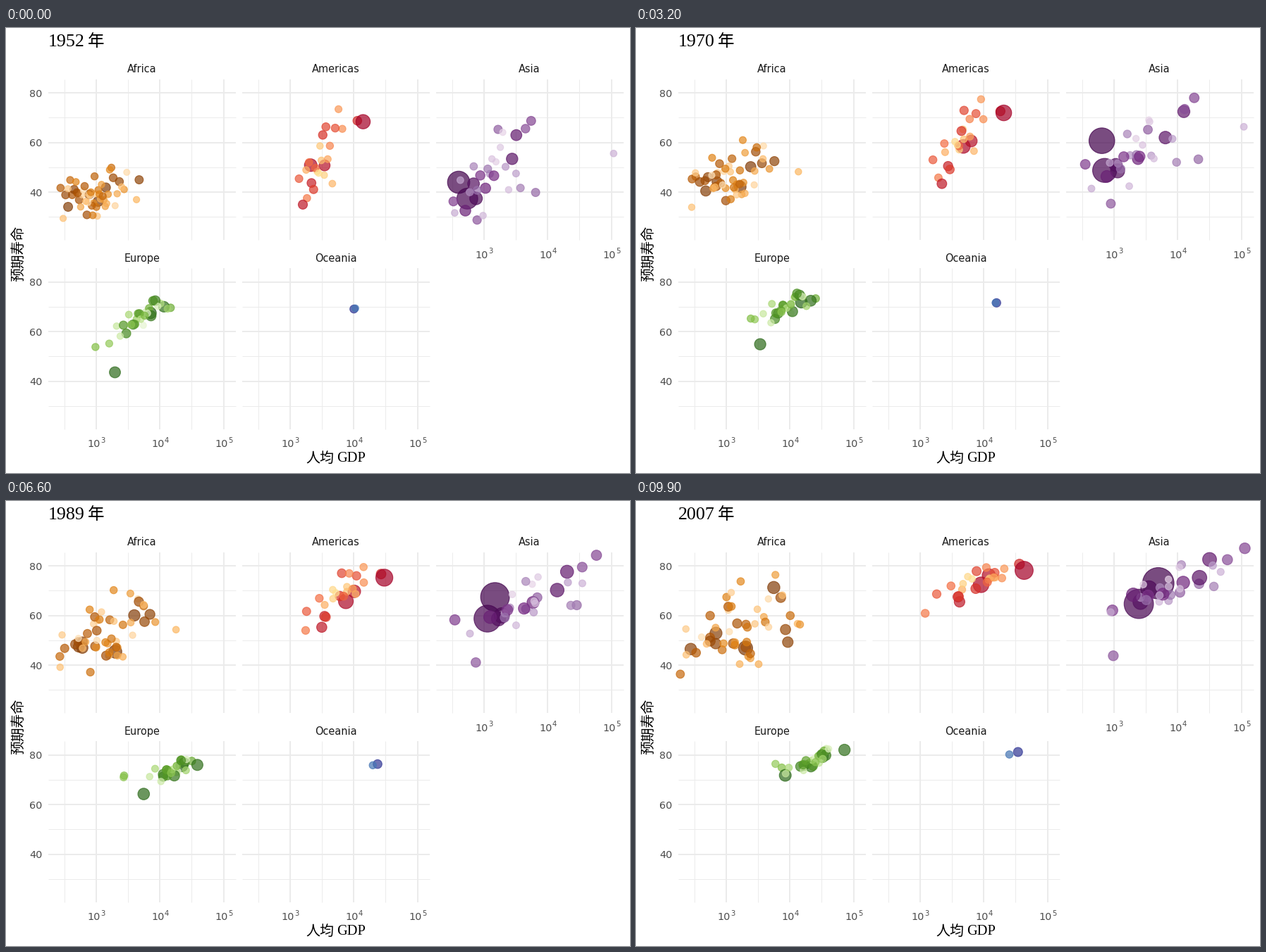
A matplotlib script for the animation above (10 s loop, 885x632 px).

```python
import matplotlib.pyplot as plt
import numpy as np
from matplotlib.animation import FuncAnimation
from matplotlib.collections import LineCollection
from matplotlib.colors import LinearSegmentedColormap

W, H, DPI = 885, 632, 64
PT = 72 / DPI                      # points per pixel
FRAMES = 100
START, MIDDLE, END = 1952, 1985, 2007
DECADE, PER_YEAR = 90.33, 3.525    # pixels per decade of GDP, per year of life
GRID, GREY, INK = "#EBEBEB", "#4D4D4D", "#1A1A1A"
SANS, SERIF, CJK = "DejaVu Sans", "Liberation Serif", "Noto Sans CJK JP"


class Region:
    """One facet: a few leading dots with own paths, then a drifting cloud."""

    def __init__(self, name, col, row, growth, *ramp):
        self.name, self.growth = name, growth
        self.left, self.top = 60 + 275 * col, 72.6 + 268.5 * row
        self.cmap = LinearSegmentedColormap.from_list(name, ramp)
        self.pops, self.leads, self.trend = [], [], None

    def lead(self, pop, *keys):
        """Population in 2007 and (year, GDP, life) waypoints."""
        year, gdp, life = np.array(keys, float).T
        self.pops.append(pop)
        self.leads.append((year, np.log10(gdp), life))

    def cloud(self, n, pop, seed, *trend):
        """Trend rows at START, MIDDLE, END: log GDP, spread, life, spread, correlation."""
        rng = np.random.default_rng(seed)
        u = np.linspace(-1, 1, n)
        bell = u * (1.2 + 0.8 * u ** 2)            # even draw from a rough bell curve
        self.z = [rng.permutation(bell) for _ in range(4)]
        self.pops += list(rng.permutation(np.geomspace(*pop, n)))
        self.trend = np.array(trend)

    def x(self, log_gdp):
        return self.left + (log_gdp - 2.248) * DECADE

    def y(self, life):
        return self.top + (85.56 - life) * PER_YEAR

    def colors(self):
        rank = np.argsort(np.argsort(-np.array(self.pops)))
        rgba = self.cmap(rank / (len(rank) - 1))
        rgba[:, 3] = 0.7
        return rgba

    def state(self, year):
        t = (year - START) / (END - START)
        gdp = np.array([np.interp(year, k, g) for k, g, _ in self.leads])
        life = np.array([np.interp(year, k, l) for k, _, l in self.leads])
        if self.trend is not None:
            g, sg, l, sl, r = (np.interp(year, (START, MIDDLE, END), c) for c in self.trend.T)
            za, zb, zc, zd = self.z
            wealth = za * np.cos(0.6 * t) + zb * np.sin(0.6 * t)
            other = zc * np.cos(1.2 * t) + zd * np.sin(1.2 * t)
            health = r * wealth + np.sqrt(1 - r * r) * other
            gdp = np.append(gdp, g + sg * wealth)
            life = np.append(life, l + sl * health)
        pop = np.array(self.pops) * (t + (1 - t) / self.growth)
        radius = 1.81 * (2 + 10 * np.sqrt(pop / 1319)) + 0.6
        return np.c_[self.x(gdp), self.y(life)], (2 * radius * PT) ** 2


africa = Region("Africa", 0, 0, 3.9, "#7F3B08", "#B35806", "#E08214", "#FDB863", "#FEE0B6")
africa.lead(64.6, (1952, 781, 39.1), (1982, 674, 47.8), (2007, 278, 46.5))
africa.lead(80.3, (1952, 1419, 41.9), (1982, 3503, 56), (2007, 5581, 71.3))
africa.lead(76.5, (1952, 362, 34.1), (1982, 578, 44.9), (2007, 691, 52.9))
africa.lead(1.5, (1952, 4293, 37), (1977, 21746, 52.8), (2007, 13206, 56.7))
africa.lead(135, (1952, 1077, 36.3), (1977, 1982, 44.5), (2007, 2014, 46.9))
africa.lead(8.9, (1952, 493, 40), (1987, 848, 44), (1992, 737, 23.6), (2007, 863, 46.2))
africa.lead(44, (1952, 4725, 45), (1992, 7226, 61.9), (2007, 9270, 49.3))
africa.cloud(45, (42, 0.4), 11,
             (2.96, 0.26, 39.2, 4.8, 0.3), (3.13, 0.33, 52.8, 7, 0.55), (3.2, 0.4, 55, 9, 0.4))

americas = Region("Americas", 1, 0, 2.1, "#A50026", "#D73027", "#F46D43", "#FDAE61", "#FEE090")
americas.lead(190, (1952, 2109, 50.9), (1977, 6660, 61.5), (2007, 9066, 72.4))
americas.lead(33.4, (1952, 11367, 68.8), (1977, 22091, 74.2), (2007, 36319, 80.7))
americas.lead(8.5, (1952, 1840, 37.6), (1982, 2011, 51.5), (2007, 1202, 60.9))
americas.lead(108.7, (1952, 3478, 50.8), (1982, 9611, 67.4), (2007, 11978, 76.2))
americas.lead(301, (1952, 13990, 68.4), (1977, 24073, 73.4), (2007, 42952, 78.2))
americas.cloud(20, (44, 1), 5,
               (3.48, 0.17, 53, 8, 0.5), (3.75, 0.2, 67.7, 5, 0.6), (3.88, 0.24, 73.4, 3, 0.6))

asia = Region("Asia", 2, 0, 2.45, "#40004B", "#762A83", "#9970AB", "#C2A5CF", "#E7D4E8")
asia.lead(31.9, (1952, 779, 28.8), (1982, 978, 39.9), (1992, 649, 41.7), (2007, 975, 43.8))
asia.lead(1319, (1952, 400, 44), (1962, 488, 44.5), (1970, 650, 61.2), (1982, 962, 65.5), (2007, 4959, 73))
asia.lead(1110, (1952, 547, 37.4), (1982, 856, 56.6), (2007, 2452, 64.7))
asia.lead(223.5, (1952, 750, 37.5), (1982, 1517, 56.2), (2007, 3541, 70.7))
asia.lead(127.5, (1952, 3217, 63), (1970, 12700, 72.6), (2007, 31656, 82.6))
asia.lead(2.5, (1952, 108382, 55.6), (1972, 109348, 67.7), (1982, 31354, 71.3), (2007, 47307, 77.6))
asia.lead(47.8, (1952, 331, 36.3), (1972, 357, 53.1), (1992, 347, 59.3), (2007, 944, 62.1))
asia.lead(169, (1952, 685, 43.4), (1982, 1443, 56.2), (2007, 2606, 65.5))
asia.lead(27.6, (1952, 6460, 39.9), (1977, 34168, 58.7), (2007, 21655, 72.8))
asia.cloud(24, (150, 0.7), 8,
           (3.14, 0.3, 48.5, 9, 0.5), (3.68, 0.43, 65, 6.5, 0.75), (3.92, 0.46, 72, 5.5, 0.8))

europe = Region("Europe", 0, 1, 1.35, "#276419", "#4D9221", "#7FBC41", "#B8E186", "#E6F5D0")
europe.lead(3.6, (1952, 1601, 55.2), (1977, 3533, 68.9), (1992, 2497, 71.6), (2007, 5937, 76.4))
europe.lead(4.5, (1952, 974, 53.8), (1977, 3528, 69.9), (1992, 2547, 72.2), (2007, 7446, 74.9))
europe.lead(82.4, (1952, 7144, 67.5), (1962, 12902, 70.3), (2007, 32170, 79.4))
europe.lead(7.5, (1952, 14734, 69.6), (1972, 27195, 73.8), (2007, 37506, 81.7))
europe.lead(71.2, (1952, 1969, 43.6), (1977, 4269, 59.5), (2007, 8458, 71.8))
europe.cloud(25, (61, 0.3), 3,
             (3.72, 0.2, 66.2, 3.8, 0.85), (4.18, 0.16, 73.6, 2.2, 0.6), (4.38, 0.2, 77.9, 2.5, 0.85))

oceania = Region("Oceania", 1, 1, 2.3, "#313695", "#4575B4")
oceania.lead(20.4, (1952, 10040, 69.1), (1972, 16789, 71.9), (2007, 34435, 81.2))
oceania.lead(4.1, (1952, 10557, 69.4), (1972, 16046, 71.9), (2007, 25185, 80.2))

REGIONS = (africa, americas, asia, europe, oceania)

fig = plt.figure(figsize=(W / DPI, H / DPI), dpi=DPI, facecolor="white")
ax = fig.add_axes([0, 0, 1, 1])
ax.set_xlim(0, W)
ax.set_ylim(H, 0)
ax.axis("off")


def label(x, y, s, size, font=SANS, color=INK, **kw):
    kw.setdefault("va", "baseline")
    return ax.text(x, y, s, fontsize=size * PT, family=font, color=color, **kw)


def grid(region, logs, lives, width):
    x0, x1 = region.left, region.left + 265.5
    y0, y1 = region.top, region.top + 228.8
    lines = [[(region.x(g), y0), (region.x(g), y1)] for g in logs]
    lines += [[(x0, region.y(l)), (x1, region.y(l))] for l in lives]
    ax.add_collection(LineCollection(lines, colors=GRID, linewidths=width * PT,
                                     capstyle="butt", zorder=1))


def x_axis(region):
    base = region.top + 254
    for power in (3, 4, 5):
        x = region.x(power)
        label(x - 12.3, base, "10", 14.4, color=GREY)
        label(x + 6.4, base - 6.5, str(power), 10, color=GREY)


clouds = []
for region in REGIONS:
    grid(region, (2.5, 3.5, 4.5), (30, 50, 70), 0.97)
    grid(region, (3, 4, 5), (40, 60, 80), 1.94)
    label(region.left + 132.7, region.top - 9.4, region.name, 14.5, ha="center")
    if region.left == 60:
        for life in (40, 60, 80):
            label(51.8, region.y(life) + 5.6, str(life), 14.4, color=GREY, ha="right")
    if region in (asia, europe, oceania):
        x_axis(region)
    pos, area = region.state(START)
    rgba = region.colors()
    clouds.append(ax.scatter(*pos.T, s=area, facecolors=rgba, edgecolors=rgba,
                             linewidths=1.18 * PT, zorder=3))

title = label(60, 26.3, "1952", 26, SERIF, "black")
label(116, 26.3, "年", 23.5, CJK, "black")
label(425.5, 616.5, "人均", 20, CJK, "black")
label(469.5, 616.5, "GDP", 20.4, SERIF, "black")
label(18, 321, "预期寿命", 19.8, CJK, "black", rotation=90, ha="center", va="center")


def update(i):
    year = START + (END - START) * i / (FRAMES - 1)
    title.set_text(f"{year:.0f}")
    for region, cloud in zip(REGIONS, clouds):
        pos, area = region.state(year)
        cloud.set_offsets(pos)
        cloud.set_sizes(area, DPI)
    return [title, *clouds]


anim = FuncAnimation(fig, update, frames=FRAMES, interval=100,
                     repeat=True, repeat_delay=0, blit=False)
plt.show()
```
